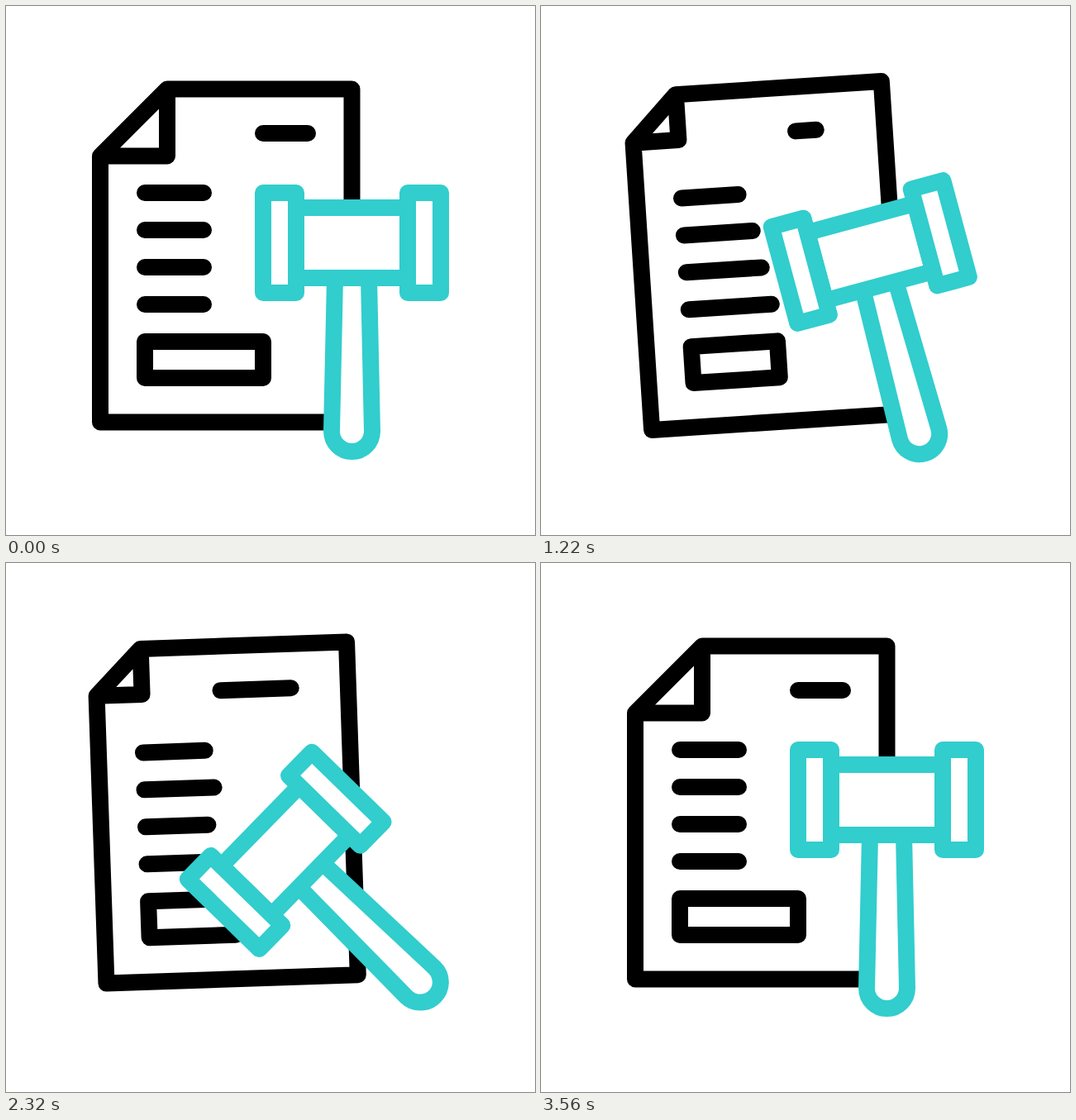
These frames come from a looping animation (640x640 px, 3.6 s). An HTML page:

```html
<!DOCTYPE html>
<html lang="en">
<head>
<meta charset="utf-8">
<title>Document and gavel</title>
<style>
  html, body { margin: 0; width: 100%; height: 100%; overflow: hidden; background: #fff; }
  svg { display: block; width: 100vw; height: 100vh; }
  g { stroke-width: 20; stroke-linecap: round; stroke-linejoin: round; }
  #doc { stroke: #000; fill: none; }
  #gavel { stroke: #32cdcd; fill: #fff; }
</style>
</head>
<body>
<svg viewBox="0 0 640 640">
  <g id="doc">
    <path id="page"/>
    <path id="lines"/>
  </g>
  <!-- local origin: centre of the handle's round end -->
  <g id="gavel">
    <path d="M-20.5-186 L-24.5 0 A24.5 24.5 0 0 0 24.5 0 L20.5-186Z"/>
    <path d="M-67.5-270.5H67.5V-185.5H-67.5Z"/>
    <path d="M-107.5-288.5h40v121h-40Z M67.5-288.5h40v121h-40Z"/>
  </g>
</svg>
<script>
const LOOP = 3600, START = 200, END = 3440;
const $ = id => document.getElementById(id);
const clamp = u => Math.min(1, Math.max(0, u));
const mix = (a, b, u) => a + (b - a) * u;
const smooth = u => (1 - Math.cos(Math.PI * u)) / 2;
const linear = u => u;

// Value at time t of a track of [time, value] keys.
function at(t, keys, ease = smooth) {
  const next = keys.findIndex(k => k[0] > t);
  if (next === 0) return keys[0][1];
  if (next < 0) return keys[keys.length - 1][1];
  const [t0, a] = keys[next - 1], [t1, b] = keys[next];
  return mix(a, b, ease((t - t0) / (t1 - t0)));
}

// Swings between 1 and -1 once per two beats, rising from 0 and settling at 0 on beat 6.
const sway = beat => beat < 1 || beat > 5 ? smooth(beat) : -Math.cos(Math.PI * beat);

// Each line's length wavers as a sum of harmonics, given by their strengths.
const BARS = [[6, 9, 0, 12, 7], [12, -5, 27, 0, -2], [14, 11, -10], [5, 12, 0, -6, -10]];
const waver = (amps, q) =>
  amps.reduce((sum, a, i) => sum + a * Math.sin((i + 1) * Math.PI * q), 71);

function drawDoc(t) {
  const beat = at(t, [[START, 0], [2545, 4], [2955, 5], [END, 6]], linear);
  const lag = beat ** 3 * (6 - beat) / 1100;
  const tilt = 5.4 * sway(beat);
  const x = 266 - 10.5 * sway(beat - lag);
  $('doc').setAttribute('transform', `translate(${x} 302) rotate(${tilt}) translate(-266 -302)`);

  const squeeze = at(t, [[START, 0], [780, 1], [2955, 1], [END, 0]]);
  const fold = mix(81, 55, squeeze);
  const box = mix(143, 104.5, squeeze);
  const fx = 114 + fold, fy = 100.5 + fold;
  $('page').setAttribute('d', `M${fx} 100.5H418.5V503.5H114V${fy}ZV${fy}H114`);

  const left = at(t, [[1230, 311], [2345, 263], [3560, 311]], linear);
  const right = at(t, [[START, 365], [1230, 335.5], [3560, 365]], linear);
  const q = clamp((t - START) / (END - START));
  const bars = BARS.map((amps, i) => `M168 ${226 + 45 * i}h${waver(amps, q)}`);
  $('lines').setAttribute('d',
    `M${left} 154H${right}${bars.join('')}M168 406h${box}v44h${-box}Z`);
}

// Gavel poses: handle end x, y and angle.
const rest = [418.5, 514.5, 0];
const windup = [423.5, 526, 9];
const hit = [501.5, 507, -46];
const lift = [492.5, 512.8, -29.8];
const leave = [499.5, 493.2, -43.9];
const over = [418.5, 514.5, 11.8];
const LEAVE = 2860;
const SWING = [[560, rest], [1000, windup], [1480, hit], [1920, lift], [2360, hit],
  [2620, lift], [LEAVE, leave], [3465, over], [3560, rest]];

function drawGavel(t) {
  const ease = t < LEAVE ? smooth : linear;
  const [x, y, angle] = rest.map((_, n) =>
    at(t, SWING.map(([time, pose]) => [time, pose[n]]), ease));
  $('gavel').setAttribute('transform', `translate(${x} ${y}) rotate(${angle})`);
}

function frame() {
  const t = performance.now() % LOOP;
  drawDoc(t);
  drawGavel(t);
  requestAnimationFrame(frame);
}
frame();
</script>
</body>
</html>
```
